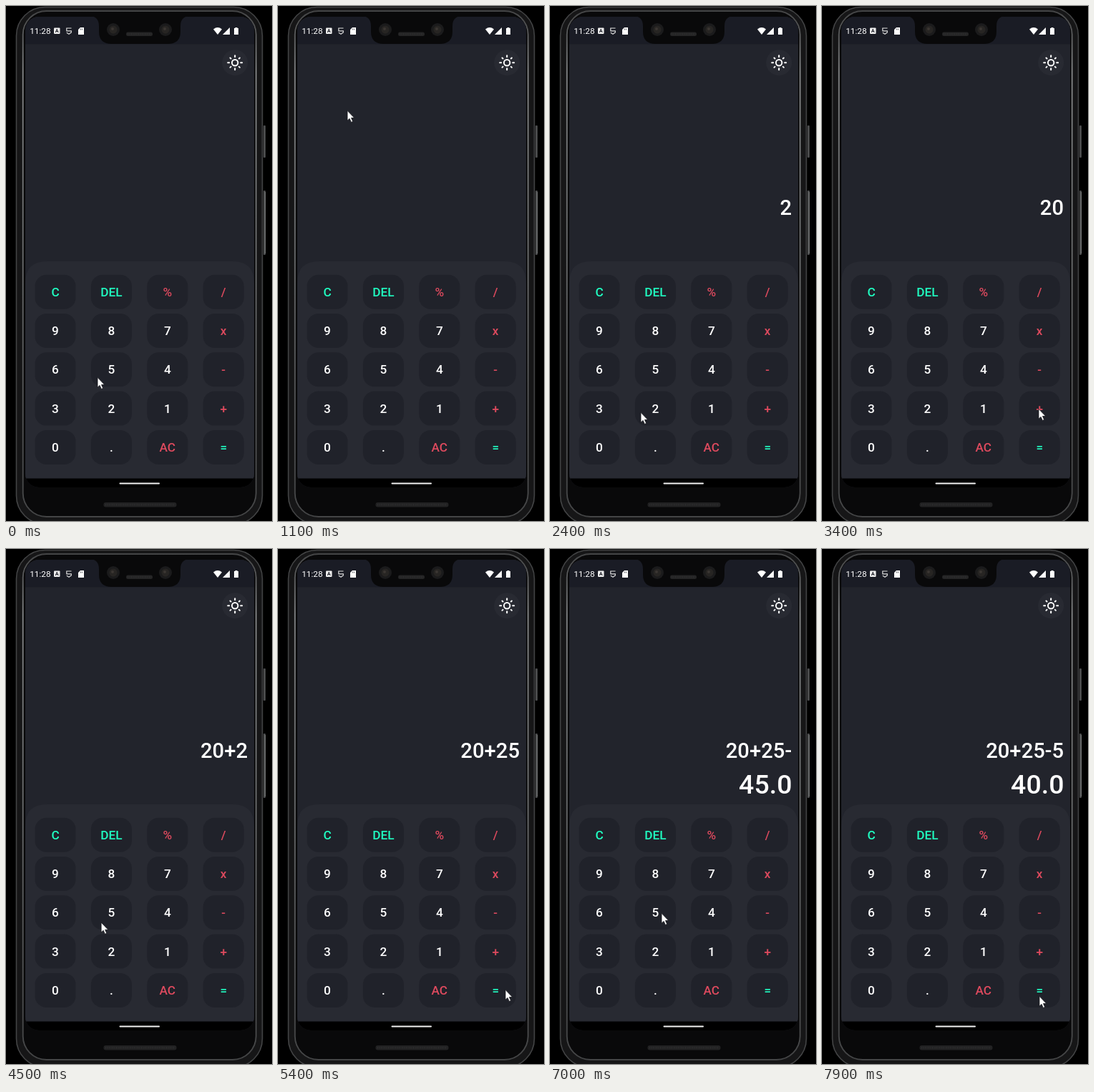
These frames come from a looping animation (372x720 px, 8000 ms). An HTML page:

```html
<!DOCTYPE html>
<html lang="en">
<head>
<meta charset="utf-8">
<title>Calculator</title>
<style>
  html, body { margin: 0; width: 100%; height: 100%; overflow: hidden; background: #000; }
  svg { display: block; width: 372px; height: 720px; }
  text { font-family: Roboto, sans-serif; fill: #fff; }
  #keys text { font-size: 17.2px; font-weight: 500; text-anchor: middle; }
  #keys rect { fill: #20222a; }
  #keys .go { fill: #20ffc2; }
  #keys .op { fill: #de4a5e; }
  .line { text-anchor: end; font-weight: 500; }
</style>
</head>
<body>
<svg viewBox="0 0 372 720">
  <defs>
    <linearGradient id="edge" x2="0" y2="1">
      <stop offset="0" stop-color="#444546"/>
      <stop offset=".12" stop-color="#858788"/>
      <stop offset=".5" stop-color="#6a6c6d"/>
      <stop offset="1" stop-color="#444546"/>
    </linearGradient>
    <clipPath id="screen"><rect x="27" y="15" width="320" height="658" rx="19"/></clipPath>
  </defs>

  <!-- phone body -->
  <rect width="372" height="720"/>
  <g fill="#4a4b4c">
    <rect x="360" y="167" width="3" height="45" rx="1"/>
    <rect x="360" y="258" width="3" height="90" rx="1"/>
    <path d="M362.5 260V346" stroke="#808182"/>
  </g>
  <rect x="14.5" y="1.5" width="344" height="723" rx="40" fill="#161617" stroke="#434445" stroke-width="1.6"/>
  <rect x="23.7" y="7" width="326" height="707" rx="33" fill="#09090a" stroke="url(#edge)" stroke-width="1.8"/>

  <!-- screen -->
  <g clip-path="url(#screen)">
    <rect x="27" y="15" width="320" height="658" fill="#22242c"/>
    <rect x="27" y="15" width="320" height="38.5" fill="#1a1c25"/>
    <path d="M27 661V387Q27 357 57 357H317Q347 357 347 387V661Z" fill="#282a32"/>
    <rect x="27" y="660.5" width="320" height="13"/>
  </g>
  <path d="M118 14Q130 15 130 28V36Q130 53 148 53H226Q244 53 244 36V28Q244 15 256 14Z" fill="#09090a"/>
  <g id="lenses"></g>
  <rect x="168" y="36.5" width="37" height="5.5" rx="2.5" fill="#242425"/>
  <rect x="136.5" y="694" width="102" height="6.5" rx="3" fill="#222223"/>
  <g stroke="#313132" stroke-width="2" stroke-dasharray="1 1.5">
    <path d="M170 39.2H203"/>
    <path d="M139 697.2H236"/>
  </g>
  <rect x="158.5" y="666.4" width="56.5" height="2" rx="1" fill="#f2f2f2"/>

  <!-- status bar -->
  <text x="33.2" y="39" font-size="11.8">11:28</text>
  <rect x="67" y="30.5" width="8.5" height="8.5" rx="1" fill="#eee"/>
  <path d="M69.3 37L71.2 32.3L73.2 37M70 35.6H72.5" fill="none" stroke="#1a1c25"/>
  <path d="M91.5 31H84.8V34.8H91.3V37L88 39.2L84.8 37.3" fill="none" stroke="#ddd" stroke-width="1.2"/>
  <path d="M104 30H109V40H101V33Z" fill="#fff"/>
  <path d="M104.5 31.5V33.5M106.5 31.5V33.5" stroke="#1a1c25" stroke-width=".7"/>
  <path d="M290 32.4Q296 27.6 302 32.4L296 40Z" fill="#fff"/>
  <path d="M313 30V40H303Z" fill="#fff"/>
  <path d="M320.5 30H323.5V31H325V40H319V31H320.5Z" fill="#fff"/>

  <!-- theme toggle -->
  <g transform="translate(320.2 79.2)">
    <circle r="18" fill="#282a32"/>
    <g id="sun" fill="none" stroke="#fff" stroke-width="2" stroke-linecap="round"><circle r="4.2"/></g>
  </g>

  <g id="keys"></g>
  <text id="sum" class="line" x="338" y="292.2" font-size="29.2"></text>
  <text id="result" class="line" x="338.5" y="341.5" font-size="37.5"></text>
  <path id="cursor" d="M0 .3V14.2L3.1 11.4L5.3 16.4L7.7 15.4L5.5 10.5H9.8Z"
        fill="#fff" stroke="#15161b" stroke-width=".8"/>
</svg>

<script>
const $ = id => document.getElementById(id);
const add = (parent, tag, attrs, text = "") => {
  const el = document.createElementNS("http://www.w3.org/2000/svg", tag);
  for (const k in attrs) el.setAttribute(k, attrs[k]);
  el.textContent = text;
  parent.append(el);
};

for (const cx of [150, 223]) {
  add($("lenses"), "circle", { cx, cy: 33, r: 9, fill: "#1b1b1c" });
  add($("lenses"), "circle", { cx, cy: 33, r: 5.5, fill: "#272523" });
  add($("lenses"), "circle", { cx: cx - 1, cy: 32, r: 2, fill: "#3a3632" });
}

for (let a = 0; a < 360; a += 45)
  add($("sun"), "path", { d: `M0 -8V${a % 90 ? -9.5 : -10}`, transform: `rotate(${a})` });

"C DEL % / 9 8 7 x 6 5 4 - 3 2 1 + 0 . AC =".split(" ").forEach((label, i) => {
  const x = 69 + (i % 4) * 78.4, y = 399.7 + Math.floor(i / 4) * 54.3;
  const kind = /^(C|DEL|=)$/.test(label) ? "go" : /^[\d.]$/.test(label) ? "" : "op";
  add($("keys"), "rect", { x: x - 28.5, y: y - 24, width: 57, height: 48, rx: 16 });
  add($("keys"), "text", { x, y: y + 5.9, class: kind }, label);
});

const LOOP = 8000, STEP = 100, TRAVEL = 400;

// where the pointer comes to rest; it sets off at most TRAVEL ms before
const stops = [
  { at: 100, x: 128, y: 519 },
  { at: 500, x: 163, y: 571 },
  { at: 900, x: 163, y: 571 },
  { at: 1100, x: 97, y: 146 },
  { at: 1600, x: 238, y: 703 },
  { at: 1800, x: 210, y: 647 },
  { at: 2100, x: 141, y: 567 },
  { at: 2400, x: 127, y: 568 },
  { at: 2800, x: 77, y: 607 },
  { at: 3400, x: 303, y: 563 },
  { at: 4300, x: 142, y: 550 },
  { at: 4600, x: 130, y: 512 },
  { at: 5200, x: 333, y: 634 },
  { at: 5400, x: 318, y: 616 },
  { at: 6300, x: 306, y: 509 },
  { at: 7000, x: 156, y: 509 },
  { at: 7400, x: 304, y: 625 }
];
const presses = { 2300: "2", 3000: "0", 3600: "+", 4500: "2", 4800: "5",
  5700: "=", 6500: "-", 7200: "5", 7700: "=" };

const ease = k => k * k * (3 - 2 * k);

function cursorAt(t) {
  const i = stops.findIndex(s => s.at > t);
  const to = stops.at(i), from = i > 0 ? stops[i - 1] : to;
  const start = Math.max(from.at, to.at - TRAVEL);
  const k = to === from ? 1 : ease(Math.min(1, Math.max(0, (t - start) / (to.at - start))));
  return [from.x + (to.x - from.x) * k, from.y + (to.y - from.y) * k];
}

const evaluate = sum => sum.match(/[+-]?\d+/g).reduce((total, n) => total + +n, 0).toFixed(1);

function displayAt(t) {
  let sum = "", result = "";
  for (const at in presses) {
    if (at > t) break;
    if (presses[at] === "=") result = evaluate(sum);
    else sum += presses[at];
  }
  return { sum, result };
}

function draw(now) {
  const t = Math.floor((now % LOOP) / STEP) * STEP;
  const { sum, result } = displayAt(t);
  $("sum").textContent = sum;
  $("result").textContent = result;
  $("cursor").setAttribute("transform", `translate(${cursorAt(t)})`);
  requestAnimationFrame(draw);
}
draw(performance.now());
</script>
</body>
</html>
```
